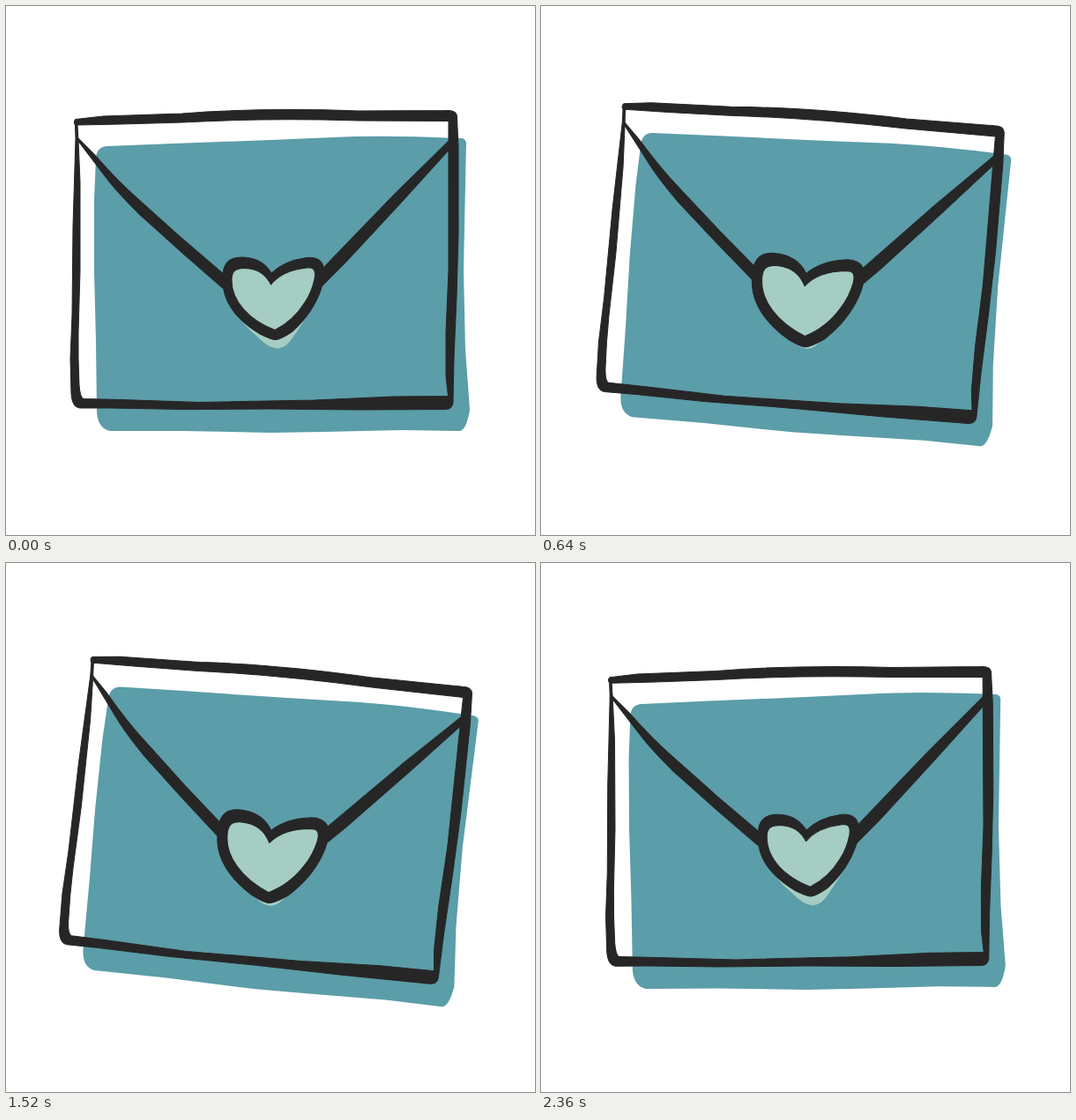
An HTML page that plays this animation: 600x600 px, repeating every 2.4 s.

```html
<!DOCTYPE html>
<html lang="en">
<head>
<meta charset="utf-8">
<title>Love letter</title>
<style>
  html, body { margin: 0; width: 100%; height: 100%; overflow: hidden; background: #fff; }
  svg { display: block; width: 100vw; height: 100vh; }
  .ink { fill: #262626; fill-rule: evenodd; stroke: #262626; stroke-linejoin: round; }
  .paper { fill: #5b9da9; }
  .seal { fill: #a5cdc3; }
</style>
</head>
<body>
<svg viewBox="0 0 600 600">
  <g id="letter">
    <path class="paper" d="M102 172Q103 160 114 159L190 156L300 152L370 149Q430 146 512 150Q521 149 522 155
      L519 300L521 390L524 430L526 458Q522 482 514 482L450 481L360 483L300 484L200 482L118 482
      Q104 479 103 460L102 380L100 300L100 220Z"/>
    <path class="seal" d="M300 309C291 293 279 291 267 291C251 291 248 300 249 315C250 340 268 360 284 374
      Q297 388 308 388.500Q318 388 326 375Q337 360 346 343C353 333 358 312 357 300
      C356 288 336 290 325 294Q310 299 300 309Z"/>
    <!-- Envelope outline, then the two flap strokes -->
    <path class="ink" d="M79 128.500L110 125L200 122Q290 115 400 119L500 118.500Q511.500 118 511.500 126L513 160L513 260L511 330
      L508 400L507 450Q506 457.500 498 457.500L400 458L300 457L200 457.500L120 456L84 456Q75 455 74 440L73 400L75 350L76 250L79 150
      L78.500 135Q76 131 79 128.500Z
      M81 135L82 152L84 200L84 300L82 370L82 400L83 430Q84 444 88 445.500L130 446.500L220 449.500L350 447L440 443L501.500 442.500
      L499 420L499 370L502 300L502 200L502 130.500L400 130Q290 127 200 132L130 134Z"/>
    <path class="ink" d="M80 148L100 168Q127 199 150 219L200 264L249 306L246 320L200 280L150 235Q125 210 113 194L81 152Z"/>
    <path class="ink" d="M506 149L440 214L356 301L357 319L385 291L450 221L508 157Z"/>
    <path id="heart" class="ink" d="M301 303C292 288 278 285 267 285C252 285 246 294 246 307C244 338 265 358 288 372
      Q301 378.500 306 378.500Q312 378 325 369Q348 348 357 322C361 311 361 303 360 296C358 286 347 284 338 286Q316 289 301 303Z
      M300.500 316C293 301 281 297.500 270 297.500C258 297.500 256 303 256 311C256 335 276 356 305 367.500
      Q326 357 339 336Q347 324 350 309C352 297 347 296.500 341 297Q313 300 300.500 316Z"/>
  </g>
</svg>
<script>
  const LOOP = 2400, STEP = 40, HALF = LOOP / 2;
  const letter = document.getElementById("letter");
  const heart = document.getElementById("heart");

  function pose(now) {
    const t = Math.floor(now % LOOP / STEP) * STEP;
    // The letter rocks at constant speed, lowest one step before the loop ends.
    const swing = 1 - Math.abs((t + STEP) % LOOP / HALF - 1);
    const angle = -0.3 + 8.95 * swing;
    // The heart beats once per half loop.
    const beat = (1 + Math.cos((t - 505) / HALF * 2 * Math.PI)) / 2;
    const scale = 0.993 + 0.123 * beat;
    letter.setAttribute("transform", `rotate(${angle} 300 300)`);
    heart.setAttribute("transform", `translate(300 300) scale(${scale}) translate(-300 -300)`);
  }

  const start = performance.now();
  function frame() {
    pose(performance.now() - start);
    requestAnimationFrame(frame);
  }
  frame();
</script>
</body>
</html>
```
